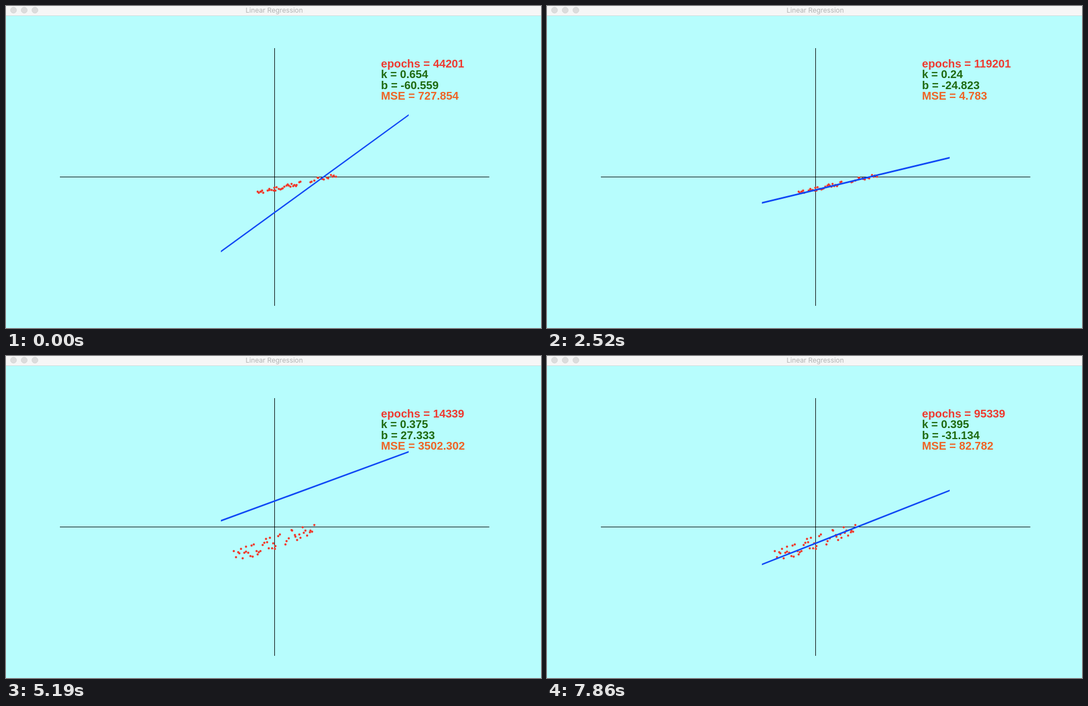
Animation, 963 px wide and 581 px high, one loop 8000 ms. Source, as an HTML page:

```html
<!DOCTYPE html>
<html lang="en">
<head>
<meta charset="utf-8">
<title>Linear Regression</title>
<style>
  html, body { margin: 0; width: 100%; height: 100%; overflow: hidden; background: #b7fdfd; }
  svg { display: block; width: 963px; height: 581px; }
  .title { font: 12.2px Inter, Roboto, sans-serif; fill: #b2b2b2; text-anchor: middle; }
  .stats { font: bold 20.2px "Liberation Sans", Arial, sans-serif; white-space: pre; }
  .points { fill: #f0392b; }
</style>
</head>
<body>
<svg viewBox="0 0 963 581">
  <rect width="963" height="581" fill="#b7fdfd"/>
  <rect width="963" height="17" fill="#f6f6f6"/>
  <rect y="17" width="963" height="1" fill="#cfdcdc"/>
  <g fill="#dcdcdc" stroke="#d0d0d0" stroke-width=".8">
    <circle cx="13.5" cy="7.5" r="5.4"/>
    <circle cx="32.8" cy="7.5" r="5.4"/>
    <circle cx="52.1" cy="7.5" r="5.4"/>
  </g>
  <text class="title" x="482.8" y="12.3">Linear Regression</text>
  <g shape-rendering="crispEdges">
    <rect x="97" y="308" width="773" height="1"/>
    <rect x="483" y="76" width="1" height="465"/>
  </g>
  <g class="points" id="first"></g>
  <g class="points" id="second"></g>
  <polygon id="fit" fill="#0f48f5"/>
  <g class="stats">
    <text id="epochs" x="675" y="111" fill="#ee3a30"/>
    <text id="slope" x="675" y="130.3" fill="#1f6a10"/>
    <text id="offset" x="675" y="149.6" fill="#1f6a10"/>
    <text id="error" x="675" y="168.9" fill="#ee6426"/>
  </g>
</svg>
<script>
const LOOP = 8000, FRAME = 148.04, LAST_FRAME = 53, SWAP_FRAME = 32;
const EPOCHS_PER_STEP = 3000, STEPS_PER_FRAME = 1.47, STEP_PHASE = 0.42;
const LAST_FIRST_STEP = 46;
const SCALE = 0.9657, ORIGIN = { x: 483.4, y: 307.9 };
const byId = id => document.getElementById(id);

// Gradient descent near its optimum: the offset error decays exponentially.
// Samples fill each span of x evenly and scatter around the optimal line.
const firstRun = {
  start: 44201, firstStep: 0, rate: 5.4782e-5, dev: -36.333,
  b: -24.2258, k: 0.23333, kPerDev: -0.011578, mse: 4.5877, curve: 0.547893,
  spans: [{ from: -32, to: -21, count: 6 }, { from: -15, to: 49, count: 24 }, { from: 65, to: 118, count: 14 }],
};
const secondRun = {
  start: 29339, firstStep: 56, rate: 1e-4, dev: 13.0498,
  b: -31.1518, k: 0.3948, kPerDev: -0.00034, mse: 82.7817, curve: 0.99971,
  spans: [{ from: -76, to: 10, count: 30 }, { from: 19, to: 76, count: 18 }],
};

function seededRandom(seed) {
  return () => (seed = (seed * 16807) % 2147483647) / 2147483647;
}

const toX = x => ORIGIN.x + x * SCALE;
const toY = y => ORIGIN.y - y * SCALE;

function plot(id, { k, b, mse, spans }) {
  const random = seededRandom(4242);
  const spread = Math.sqrt(3 * mse);
  let dots = "";
  for (const { from, to, count } of spans) {
    for (let i = 0; i < count; i++) {
      const x = from + (to - from) * (i + random()) / count;
      const y = k * x + b + spread * (2 * random() - 1);
      dots += `<circle cx="${Math.round(toX(x))}" cy="${Math.round(toY(y))}" r="2"/>`;
    }
  }
  byId(id).innerHTML = dots;
}

function solve(run, epoch) {
  const dev = run.dev * Math.exp(-run.rate * (epoch - run.start));
  return {
    k: run.k + run.kPerDev * dev,
    b: run.b + dev,
    mse: run.mse + run.curve * dev * dev,
  };
}

function drawLine({ k, b }) {
  const half = 1.45;
  const at = (x, shift) => `${toX(x)},${toY(k * x + b) + shift}`;
  byId("fit").setAttribute("points",
    [at(-100, -half), at(250, -half), at(250, half), at(-100, half)].join(" "));
}

const round3 = value => Number(value.toFixed(3));

function render(time) {
  const frame = Math.min(LAST_FRAME, Math.floor((time % LOOP) / FRAME));
  const run = frame > SWAP_FRAME ? secondRun : firstRun;
  const rawStep = Math.floor(frame * STEPS_PER_FRAME + STEP_PHASE);
  const step = run === firstRun ? Math.min(rawStep, LAST_FIRST_STEP) : rawStep;
  const epoch = run.start + (step - run.firstStep) * EPOCHS_PER_STEP;
  const { k, b, mse } = solve(run, epoch);

  // The line is redrawn one step later than the numbers.
  drawLine(solve(run, epoch - EPOCHS_PER_STEP));
  byId("first").style.display = frame < SWAP_FRAME ? "" : "none";
  byId("second").style.display = frame < SWAP_FRAME ? "none" : "";
  byId("epochs").textContent = `epochs = ${epoch}`;
  byId("slope").textContent = `k = ${round3(k)}`;
  byId("offset").textContent = `b = ${round3(b)}`;
  byId("error").textContent = `MSE = ${round3(mse)}`;
}

plot("first", firstRun);
plot("second", secondRun);
render(0);

(function tick() {
  render(performance.now());
  requestAnimationFrame(tick);
})();
</script>
</body>
</html>
```
